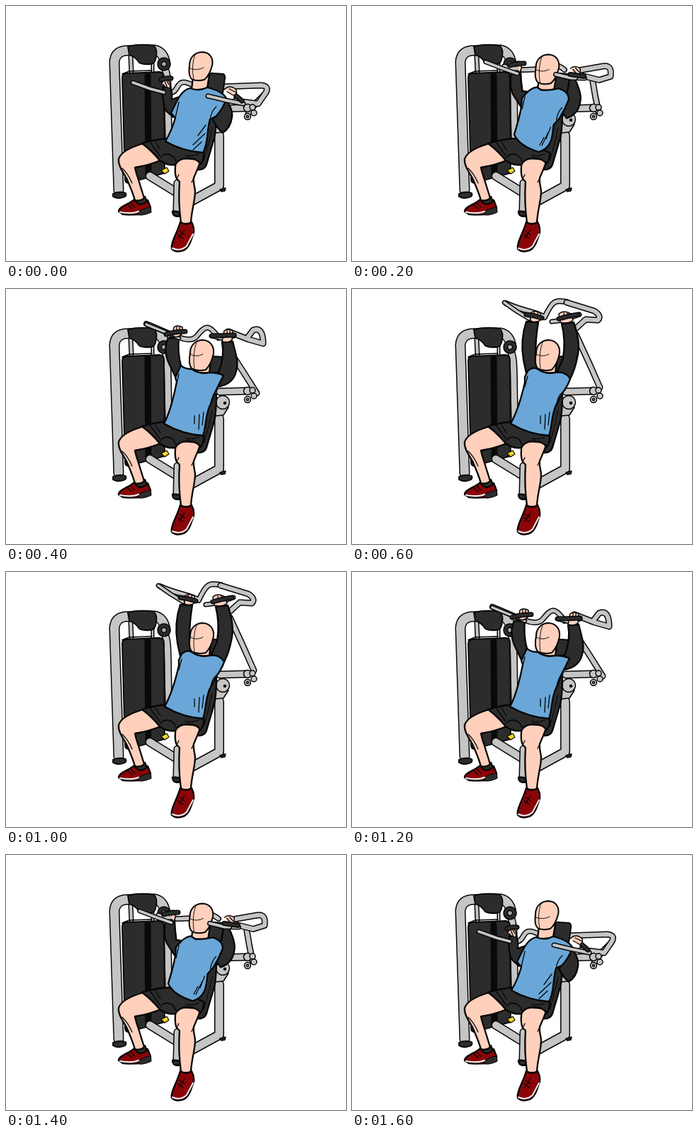
An HTML page for the animation above (1.8 s loop, 480 px wide and 360 px high).

```html
<!DOCTYPE html>
<html lang="en">
<head>
<meta charset="utf-8">
<title>Shoulder press</title>
<style>
html, body { margin: 0; width: 100%; height: 100%; overflow: hidden; background: #fff; }
svg { display: block; width: 480px; height: 360px; }
path { stroke-linecap: round; stroke-linejoin: round; }
</style>
</head>
<body>
<svg id="stage" viewBox="0 0 480 360"></svg>
<script>
const INK = '#050505', DARK = '#2c2c2c', STEEL = '#c5c5c5', SKIN = '#ffd0bc',
      BLUE = '#6aa7d8', RED = '#8b0508';

const shape = (fill, d, width = 2.3) =>
  `<path d="${d}" fill="${fill}" stroke="${INK}" stroke-width="${width}"/>`;
const line = (d, width = 1.3, color = INK) => shape('none', d, width).replace(INK, color);
const tube = (width, d, color = STEEL) => line(d, width + 3) + line(d, width, color);
const disc = (x, y, r, fill) =>
  `<circle cx="${x}" cy="${y}" r="${r}" fill="${fill}" stroke="${INK}" stroke-width="1.5"/>`;

const machine = [
  tube(8, 'M222 84C231 96 227 120 230 192'),
  shape(DARK, 'M164 101Q164 96 170 95L217 93Q223 94 223 100L224 236L172 250Q168 249 168 244Z', 1.8),
  line('M200 98L201 240', 9, '#090909'),
  tube(4, 'M176 70L177 92'), tube(2, 'M207 80V92'),
  line('M164 96L174 92L206 91', 1.6),
  tube(12, 'M159 260L153 79Q154 65 168 63L210 62Q223 65 225 82'),
  shape(DARK, 'M172 57Q190 53 209 56Q214 62 212 71Q211 82 204 82Q193 83 188 80Q183 72 174 69Z', 1.8),
  shape(DARK, 'M151 265Q160 261 169 264Q171 268 166 270Q157 273 151 269Z', 1.8),
  disc(223, 82, 9, DARK), disc(223, 82, 3.5, '#aaa'),
  tube(10, 'M203 240L242 264'),
  shape('#f3da24', 'M219 232L227 228L230 233L224 237Z', 1.2),
  tube(11, 'M301 183V254L246 284'),
  tube(8, 'M242 250L241 288'),
  shape(DARK, 'M235 290Q241 289 247 292Q248 297 241 297Q235 296 235 290Z'),
  shape(DARK, 'M302 259L310 257L309 261L304 262Z', 1.4),
  shape(STEEL, 'M287 180L297 160L314 167L307 178Z', 1.6),
  tube(8, 'M302 145L338 144'),
  disc(306, 160, 9.5, STEEL), disc(309, 161, 1.5, INK)
].join('');

const clamp = [disc(341, 144, 5.5, STEEL), disc(348, 143, 4, STEEL), disc(350, 151, 4, STEEL),
  disc(341, 156, 4.5, STEEL), disc(341, 156, 1.5, '#eee')].join('');

const seat = [
  shape(DARK, 'M286 97Q288 94 293 95L307 96Q310 98 309 103L306 124L285 120Z', 1.8),
  shape(DARK, 'M288 149L297 148Q297 178 293 190L283 224Q280 232 270 231L262 215Z'),
  line('M291 172Q287 192 279 218', 1)
].join('');

const legs = [
  shape(DARK, 'M181 274L196 269L201 281L186 284Z'),
  shape(SKIN, 'M194 194C177 199 162 206 159 216C158 225 165 234 170 243C175 254 179 264 182 274'
    + 'Q190 276 195 271C191 258 187 245 184 236L182 228Q201 225 218 218Z'),
  line('M164 229Q172 236 178 250M192 226L182 228'),
  shape(RED, 'M159 290C159 283 174 280 181 273Q185 280 190 280Q197 279 200 274L204 284L204 291Q190 296 165 294Z'),
  shape(DARK, 'M187 290Q198 284 204 284L205 291Q196 296 188 295Z', 1),
  line('M161 291Q178 294 187 290', 2.2, '#eee'),
  line('M172 281L178 286M176 278L182 284'),
  shape(SKIN, 'M241 214C238 226 238 238 241 244L245 248C244 262 244 284 247 306Q254 309 261 306'
    + 'C262 288 267 274 267 262C267 256 264 250 265 243C268 235 272 228 275 217Z'),
  line('M241 244L244 238M265 243L262 249'),
  shape(RED, 'M246 305Q254 311 262 305Q266 312 265 320C261 331 259 341 251 345Q240 349 234 343C232 335 241 322 246 305Z'),
  line('M235 342Q246 347 255 339L264 322', 2, '#eee'),
  line('M245 318L252 323M243 323L250 328M252 316L244 328'),
  shape(DARK, 'M192 194Q211 188 230 187L279 207Q280 215 275 223Q268 214 256 215Q244 215 239 224Q228 226 217 218Q207 205 192 194Z'),
  line('M204 193L217 211M211 192L218 203M218 214Q221 209 228 209Q237 210 240 220M272 209Q262 213 254 211')
].join('');

// Each moving part: painter, then its path when low, halfway and high.
const levers = [
  [d => tube(5, d), 'M232 122C246 122 238 98 264 112C280 112 290 112 300 111',
    'M198 49C236 64 258 79 269 67C281 52 286 48 300 69', 'M217 20C243 32 262 32 272 40C284 14 288 16 303 18'],
  [d => tube(6, d), 'M364 126L352 138L342 152', 'M316 88L335 117L354 147', 'M316 64L334 103L350 139'],
  [d => tube(6, d), 'M304 114L360 112Q372 113 367 122L356 138L324 134',
    'M342 67L349 58Q363 53 363 77L342 71L314 60', 'M303 19L342 31Q353 38 347 44L330 43L309 62']
];

const body = [
  // arms
  [d => shape(DARK, d), 'M222 115C221 128 221 142 227 149L236 157Q243 146 245 128L234 132Q235 122 232 114Z',
    'M229 69C223 82 226 96 230 105L240 126Q249 122 255 115L247 108Q242 90 244 69Z',
    'M246 46C240 64 239 82 242 100L246 119Q255 119 262 111L259 96Q259 70 263 47Z'],
  [d => shape(DARK, d), 'M309 130C314 136 321 148 319 157Q317 172 306 179Q297 172 292 160L300 151Q302 140 309 130Z',
    'M320 74C324 90 329 104 325 116Q321 134 300 138Q297 130 294 118L300 118Q309 96 305 75Z',
    'M313 47C319 64 322 82 318 97Q315 113 308 127Q299 126 290 116L298 98Q302 72 296 49Z'],
  // neck
  [d => shape(SKIN, d), 'M264 100L262 118Q273 124 284 116L287 98Z', 'M264 108L262 115Q274 120 287 118L289 104Z',
    'M265 108L263 116Q274 120 287 118L289 104Z'],
  // shirt
  [d => shape(BLUE, d), 'M260 116C246 119 240 137 233 151L239 158Q234 176 225 191Q249 205 278 207C286 194 283 176 288 160L296 156Q307 145 311 130Q305 120 284 115Q272 121 260 116Z',
    'M262 113C255 113 251 112 247 108L239 125L241 131Q233 172 223 190Q249 205 278 207C283 194 281 176 289 162L295 146Q301 134 307 122Q300 118 287 118Q274 121 262 113Z',
    'M262 113C256 110 252 112 248 116L244 124L244 132Q236 168 224 190Q249 205 278 207C283 194 281 176 289 162L297 147Q304 138 308 127Q302 116 287 118Q274 121 262 113Z'],
  [d => line(d), 'M244 136L239 158M288 160Q290 148 297 142M282 168L271 183M281 180L264 196M276 192L264 203',
    'M244 120L241 133M289 162Q291 150 296 145M279 174L277 192M273 177L272 198M266 179L266 190',
    'M248 123L244 138M289 162Q291 150 297 146M279 174L277 192M273 177L272 198M266 179L266 190'],
  // head
  [d => shape(SKIN, d, 2), 'M259 84C259 71 268 65 278 65C289 66 293 75 291 84C289 92 286 99 280 104Q268 107 262 103Q257 98 259 84Z',
    'M260 90C260 79 268 72 278 72C289 73 294 81 293 91C291 101 288 108 282 114Q270 117 262 112Q257 106 260 90Z'],
  [d => line(d, .9), 'M259 88Q270 92 279 87M267 68Q261 84 265 104', 'M260 92Q269 97 278 92M269 75Q263 92 266 113'],
  // bars, hands and grips
  [d => tube(3.5, d), 'M179 108L204 117L223 122', 'M198 50L220 59L244 69', 'M215 19L232 31L250 42'],
  [d => tube(4, d), 'M285 127L310 133L335 138', 'M290 66L307 70L322 66', 'M282 46L299 44L321 36'],
  [d => shape(SKIN, d, 1.5), 'M220 109Q223 103 229 105Q233 109 231 116Q225 120 221 116Z',
    'M237 54Q242 50 249 54L249 62Q243 71 235 66Z', 'M252 34Q258 29 266 34L267 43Q260 49 252 45Z'],
  [d => shape(SKIN, d, 1.5), 'M309 117Q316 111 324 117Q328 122 322 130Q315 136 308 129Z',
    'M308 59Q313 55 320 59L319 72Q313 77 305 74Z', 'M292 35Q299 29 309 35L312 44Q304 50 294 47Z'],
  [d => line(d), 'M224 106L227 113M227 106L230 111M312 121L321 126M315 117L325 122',
    'M241 53L241 59M245 53L245 59M312 58L312 64M316 58L316 64', 'M257 33L258 40M262 33L263 40M299 34L300 41M304 34L305 41'],
  [d => tube(4, d, DARK), 'M219 104Q225 101 233 102', 'M226 64Q239 60 253 60', 'M246 36Q257 37 268 41'],
  [d => tube(4, d, DARK), 'M325 127Q329 130 333 134', 'M291 66Q306 66 322 65', 'M292 42Q305 38 319 36']
];

const mix = (from, to, t) => {
  const ends = to.match(/[\d.]+/g);
  let i = 0;
  return from.replace(/[\d.]+/g, n => +(+n + (ends[i++] - n) * t).toFixed(1));
};

const draw = (parts, lift) => parts.map(([paint, low, mid, high = mid]) =>
  paint(lift < 1 ? mix(low, mid, lift) : mix(mid, high, lift - 1))).join('');

const STEP = 200, LIFTS = [0, .5, 1, 2, 2.33, 2, 1, .5, 0];
const stage = document.getElementById('stage');
let shown;

function tick() {
  const lift = LIFTS[Math.floor(performance.now() / STEP) % LIFTS.length];
  if (lift !== shown) {
    shown = lift;
    stage.innerHTML = machine + draw(levers, lift) + clamp + seat + legs + draw(body, lift);
  }
  requestAnimationFrame(tick);
}
tick();
</script>
</body>
</html>
```
